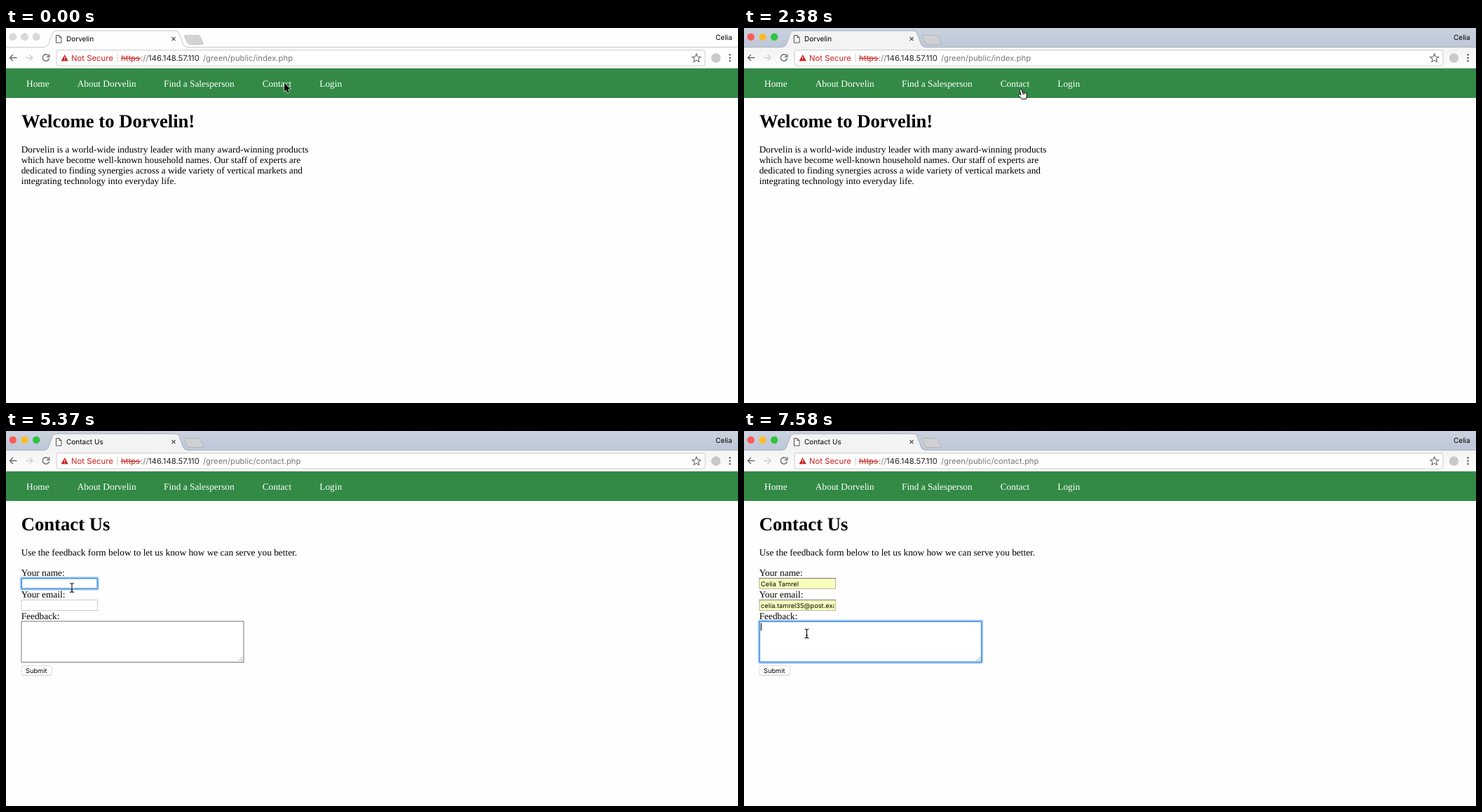
An HTML page for the animation above (8000 ms loop, 1044x536 px).

```html
<!DOCTYPE html>
<html lang="en">
<head>
<meta charset="utf-8">
<title>Contact form walkthrough</title>
<style>
html, body { margin: 0; width: 100%; height: 100%; overflow: hidden; background: #fefefe; }
svg { display: block; width: 100%; height: 100%; }
text { font: 13.33px "Liberation Serif", serif; text-rendering: geometricPrecision; white-space: pre; }
text.h1 { font-size: 26.67px; font-weight: bold; }
.nav text { fill: #fff; }
text.ui { font: 10px Inter, sans-serif; }
text.url { font: 11.3px Inter, sans-serif; }
text.field { font: 9.25px Inter, sans-serif; }
text.item { font: 10.4px Inter, sans-serif; }
.line { fill: none; stroke-width: 1.4; }
.box { fill: #fff; stroke: #ccc; }
.filled { fill: #faffbd; stroke: #b9b9a4; }
.ring { fill: none; stroke: #5b9fea; stroke-width: 2; }
.glow { fill: none; stroke: #5b9fea; stroke-width: 4; opacity: .35; }
.caret { stroke: #000; }
</style>
</head>
<body>
<svg viewBox="0 0 1044 536" preserveAspectRatio="none">
  <defs>
    <linearGradient id="strip" x2="0" y2="1">
      <stop stop-color="#cbd2df"/><stop offset="1" stop-color="#bdc7d8"/>
    </linearGradient>
    <linearGradient id="bar" x2="0" y2="1">
      <stop stop-color="#f3f3f3"/><stop offset="1" stop-color="#fdfdfd"/>
    </linearGradient>
    <clipPath id="emailClip"><rect x="23" y="242" width="105.5" height="14"/></clipPath>
    <path id="tab" d="M0 27.5H54Q59 27 60.5 23L66 8Q67.500 4 71 4H242Q245.500 4 247 8L252.500 23Q254 27 259 27.500H1044"/>
    <path id="newTab" d="M256 10.500H274Q276 10.500 277 12.500L281 21.500Q281.500 23.500 279 23.500H262Q260 23.500 259 21.500L254.500 12.500Q254 10.500 256 10.500Z"/>
  </defs>

  <rect width="1044" height="536" fill="#fefefe"/>

  <!-- window frame, unfocused then focused -->
  <g data-show="0 140">
    <use href="#tab" fill="none" stroke="#c9c9c9"/>
    <use href="#newTab" fill="#d3d3d3" stroke="#c6c6c6"/>
    <g fill="#dadada" stroke="#cbcbcb" stroke-width=".6">
      <circle cx="9.800" cy="12.700" r="5"/><circle cx="26.500" cy="12.700" r="5"/><circle cx="43.200" cy="12.700" r="5"/>
    </g>
  </g>
  <g data-show="140 8000">
    <rect width="1044" height="27.500" fill="url(#strip)"/>
    <rect y="27" width="1044" height="30" fill="url(#bar)"/>
    <use href="#tab" fill="#f3f3f3" stroke="#a5adba" stroke-width=".9"/>
    <use href="#newTab" fill="#d1d1d1" stroke="#a9b0bb" stroke-width=".8"/>
    <circle cx="9.800" cy="12.700" r="5.200" fill="#fc5b56"/>
    <circle cx="26.500" cy="12.700" r="5.200" fill="#fdbc2f"/>
    <circle cx="43.200" cy="12.700" r="5.200" fill="#2fc440"/>
  </g>

  <!-- tab contents and toolbar -->
  <path d="M71.500 10.500H76L79 13.500V21H71.500ZM76 10.500V13.500H79" fill="#fff" stroke="#4d4d4d"/>
  <path class="line" d="M236.500 13l5 5m0-5l-5 5" stroke="#555" style="stroke-width:1.2"/>
  <text class="ui" x="1012" y="16.700">Celia</text>
  <g class="line" stroke="#6a6a6a">
    <path d="M15.500 42.500H5.500M10 38L5.500 42.500L10 47"/>
    <path d="M28 42.500H38M33.500 38L38 42.500L33.500 47" stroke="#cfcfcf"/>
    <path d="M60.600 39.400A4.700 4.700 0 1 0 61.600 43.500M61.800 37.500V41.300H58"/>
  </g>
  <rect x="72" y="31.500" width="925" height="22.500" rx="3" class="box"/>
  <path d="M83.700 38L88.800 47.200H78.600Z" fill="#cb211c"/>
  <path d="M83.700 41v3m0 1v1" stroke="#fff"/>
  <text class="url" x="93" y="47" fill="#cb211c">Not Secure</text>
  <path d="M159 36.500V49" stroke="#ccc"/>
  <text class="url" x="164" y="47" fill="#cb211c">https</text>
  <path d="M164 43.500H192" stroke="#cb211c"/>
  <text class="url" x="192" y="47" fill="#777">://</text>
  <text class="url" x="203" y="47" fill="#222">146.148.57.110</text>
  <path d="M984.700 37l1.700 4 4.300.4-3.300 2.800 1 4.200-3.700-2.300-3.700 2.300 1-4.200-3.300-2.800 4.300-.4Z" class="line" stroke="#666" style="stroke-width:1.1"/>
  <circle cx="1012.500" cy="43" r="6.700" fill="#c9c9c9"/>
  <g fill="#5f5f5f">
    <circle cx="1032.500" cy="38.300" r="1.300"/><circle cx="1032.500" cy="42.700" r="1.300"/><circle cx="1032.500" cy="47.100" r="1.300"/>
  </g>

  <!-- site navigation -->
  <rect y="57" width="1044" height="1" fill="#bcc6be"/>
  <rect y="58" width="1044" height="42" fill="#328a45"/>
  <g class="nav">
    <text x="29" y="84.300">Home</text>
    <text x="101.700" y="84.300">About Dorvelin</text>
    <text x="225" y="84.300">Find a Salesperson</text>
    <text x="365.700" y="84.300">Contact</text>
    <text x="447.300" y="84.300">Login</text>
  </g>

  <!-- welcome page -->
  <g data-show="0 3130">
    <text class="ui" x="86" y="19.300">Dorvelin</text>
    <text class="url" x="281" y="47" fill="#777">/green/public/index.php</text>
    <text class="h1" x="22" y="141.700">Welcome to Dorvelin!</text>
    <text x="21.700" y="178.300">Dorvelin is a world-wide industry leader with many award-winning products</text>
    <text x="21.700" y="193.300">which have become well-known household names. Our staff of experts are</text>
    <text x="21.700" y="208.300">dedicated to finding synergies across a wide variety of vertical markets and</text>
    <text x="21.700" y="223.300">integrating technology into everyday life.</text>
  </g>

  <!-- contact page -->
  <g data-show="3130 8000">
    <text class="ui" x="86" y="19.300">Contact Us</text>
    <text class="url" x="281" y="47" fill="#777">/green/public/contact.php</text>
    <text class="h1" x="21.700" y="141.700">Contact Us</text>
    <text x="21.700" y="178.300">Use the feedback form below to let us know how we can serve you better.</text>
    <text x="21.700" y="206.700">Your name:</text>
    <text x="21.700" y="237.600">Your email:</text>
    <text x="21.700" y="268.500">Feedback:</text>
    <rect class="box" x="22" y="210.500" width="108.500" height="15"/>
    <rect class="box" x="22" y="241.500" width="108.500" height="15"/>
    <rect class="box" x="22" y="272" width="317" height="58.500" style="stroke:#777"/>
    <path d="M331.500 329l6.500-6.500M335 329l3-3" stroke="#888" stroke-width=".8"/>
    <rect x="22" y="335.800" width="43.500" height="14" rx="3" fill="#c9c9c9"/>
    <rect class="box" x="22" y="335.500" width="43.500" height="13.500" rx="3" style="stroke:#ddd"/>
    <text class="field" x="28" y="346">Submit</text>
  </g>
  <g data-show="6250 8000">
    <rect class="filled" x="22" y="210.500" width="108.500" height="15"/>
    <path d="M21.500 210.500H131" stroke="#777"/>
    <text class="field" x="24" y="221.600">Celia Tamrel</text>
  </g>
  <g data-show="6540 8000">
    <rect class="filled" x="22" y="241.500" width="108.500" height="15"/>
    <path d="M21.500 241.500H131" stroke="#777"/>
    <text class="field" x="24" y="252.500" clip-path="url(#emailClip)">celia.tamrel35@post.example</text>
  </g>
  <g data-show="5370 7430">
    <rect class="glow" x="21.500" y="210" width="109.500" height="16" rx="1"/>
    <rect class="ring" x="22" y="210.500" width="108.500" height="15" rx="1"/>
  </g>
  <path class="caret" data-show="5660 6110" d="M24.500 213V223.500"/>
  <path class="caret" data-show="6540 6990" d="M24.500 213V223.500"/>
  <g data-show="5520 6540">
    <rect x="22.500" y="226.500" width="233" height="41.500" fill="#fff" stroke="#a3c0e2"/>
    <rect data-show="6250 6540" x="23" y="227" width="232" height="20" fill="#e9eef6"/>
    <path d="M23 247.500H255" stroke="#d3deec"/>
    <text class="item" x="29" y="241.300" style="font-weight:600">Celia Tamrel</text>
    <text class="ui" x="248.500" y="241.200" text-anchor="end" fill="#808080">celia.tamrel35@post.example</text>
    <text class="item" x="29" y="262">Autofill settings</text>
  </g>
  <g data-show="7430 8000">
    <rect class="glow" x="21.500" y="271.500" width="318" height="59.500" rx="1"/>
    <rect class="ring" x="22" y="272" width="317" height="58.500" rx="1"/>
    <path class="caret" d="M24.500 274.500V285.500"/>
  </g>

  <!-- pointer shapes, each with its hot spot at the origin -->
  <g id="pointer">
    <path id="arrow" d="M0 0V12.300L2.800 9.700L4.800 14.200L6.800 13.300L4.900 9H8.700Z" stroke="#fff" stroke-width="1.100" paint-order="stroke"/>
    <path id="hand" d="M2.500 1.200Q3.700-.3 4.900 1L6.200 5Q7.400 4.100 8.300 5.200Q9.500 4.500 10.300 5.700Q11.800 5.400 12 7.100L12.300 10Q12.300 12 11.200 14.500H5.200Q3.800 12.300 1 9.800Q-.2 8.200 1 7.500Q2.200 7.200 4 8.700L2.400 2.700ZM6.500 5l.8 3M8.500 5.500l.5 2.500" fill="#fff" stroke="#000"/>
    <g id="beam" fill="none">
      <path d="M-3-6.500Q0-6.500 0-4.500Q0-6.500 3-6.500M0-4.500V4.500M-3 6.500Q0 6.500 0 4.500Q0 6.500 3 6.500M-1.500 2.500H1.500" stroke="#fff" stroke-width="2.500" opacity=".7"/>
      <path d="M-3-6.500Q0-6.500 0-4.500Q0-6.500 3-6.500M0-4.500V4.500M-3 6.500Q0 6.500 0 4.500Q0 6.500 3 6.500M-1.500 2.500H1.500" stroke="#111" stroke-width="1.100"/>
    </g>
  </g>
</svg>
<script>
const LOOP = 8000;
// time, x, y, pointer shape
const moves = [
  [0, 397, 78.5, "arrow"],
  [1500, 365, 131, "arrow"],
  [1650, 322, 224, "arrow"],
  [1800, 295, 294, "arrow"],
  [1950, 293, 307, "arrow"],
  [2090, 320, 258, "arrow"],
  [2240, 374, 146, "arrow"],
  [2380, 391, 87, "hand"],
  [4630, 233, 138, "arrow"],
  [4780, 165, 178, "arrow"],
  [4930, 118, 202, "arrow"],
  [5070, 100, 217, "beam"],
  [5220, 94, 224, "beam"],
  [6250, 98, 233, "arrow"],
  [6400, 99.5, 236, "arrow"],
  [6990, 98, 249, "arrow"],
  [7140, 93, 272, "arrow"],
  [7290, 89.5, 289.5, "beam"]
];
const shapes = ["arrow", "hand", "beam"].map(id => document.getElementById(id));
const pointer = document.getElementById("pointer");
const timed = [...document.querySelectorAll("[data-show]")].map(node => {
  const [from, to] = node.dataset.show.split(" ").map(Number);
  return { node, from, to };
});
const show = (node, on) => { node.style.display = on ? "" : "none"; };

function draw(now) {
  const t = now % LOOP;
  for (const { node, from, to } of timed) show(node, t >= from && t < to);
  const [, x, y, kind] = moves.findLast(move => move[0] <= t);
  pointer.setAttribute("transform", `translate(${x} ${y})`);
  for (const shape of shapes) show(shape, shape.id === kind);
}

const start = performance.now();
function tick() {
  draw(performance.now() - start);
  requestAnimationFrame(tick);
}
tick();
</script>
</body>
</html>
```
